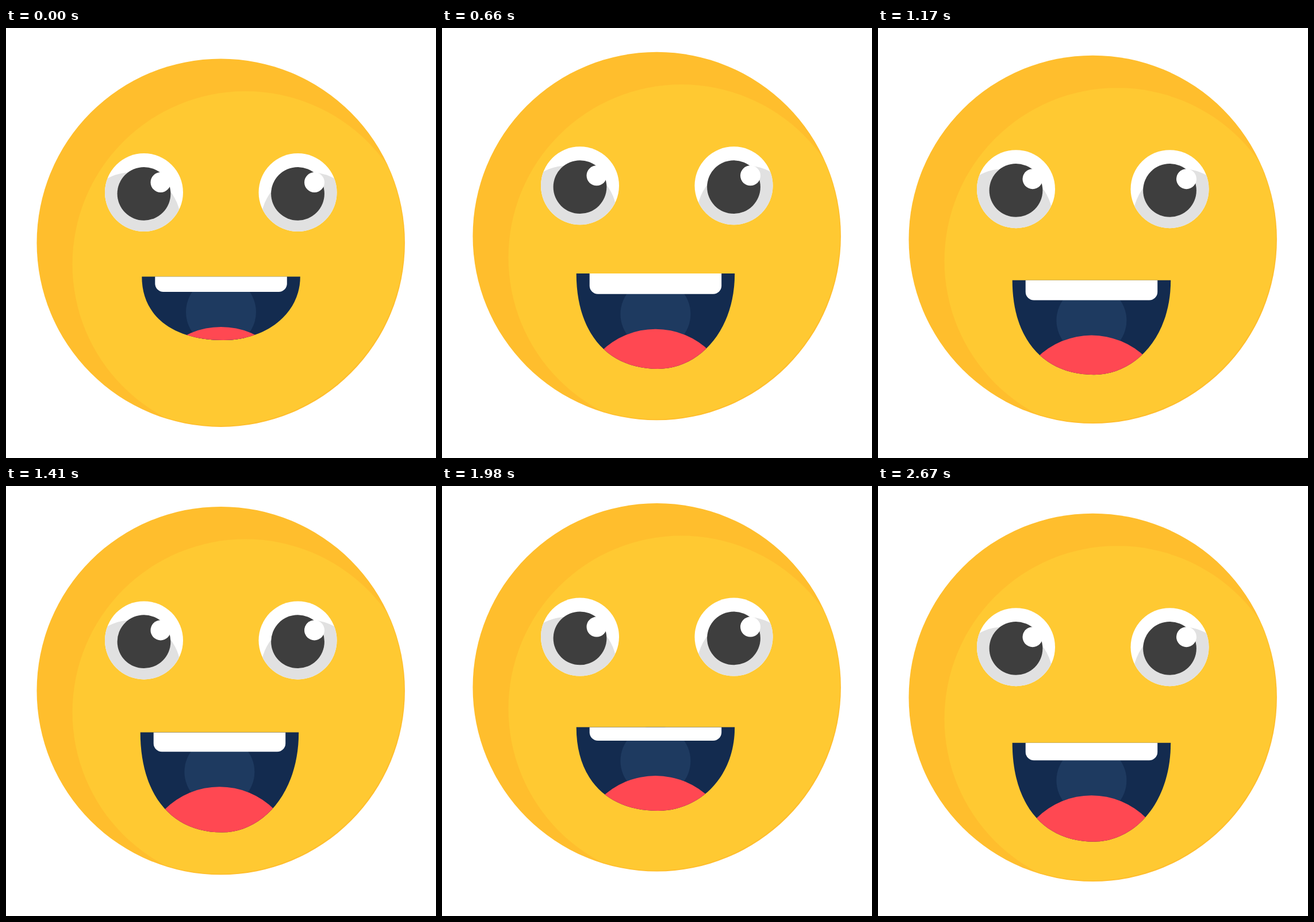
These frames come from a looping animation (748 by 748 pixels, 2.7 s). An HTML page:

```html
<!DOCTYPE html>
<html lang="en">
<head>
<meta charset="utf-8">
<title>Bouncing smiley</title>
<style>
html, body { margin: 0; width: 100%; height: 100%; overflow: hidden; background: #fff; }
svg { display: block; width: 100vw; height: 100vh; }
</style>
</head>
<body>
<svg viewBox="0 0 748 748">
  <defs>
    <clipPath id="faceClip"><circle cx="372.5" cy="372.3" r="319.7"/></clipPath>
    <clipPath id="eyeClip"><circle r="68"/></clipPath>
    <clipPath id="lipClip"><path class="lips" d="M0 0C0 .63 55 1 142 1C212.5 1 275.5 .61 275.5 0Z"/></clipPath>
    <g id="eyeball">
      <circle r="68" fill="#fff"/>
      <circle cx="-22" cy="51" r="86" fill="#e1e1e1" clip-path="url(#eyeClip)"/>
    </g>
    <g id="pupil">
      <circle cy="2.3" r="46.4" fill="#3e3e3e"/>
      <circle cx="29" cy="-17.5" r="17.5" fill="#fff"/>
    </g>
  </defs>
  <g id="head">
    <circle cx="373.7" cy="373.7" r="320.2" fill="#ffbe2d"/>
    <circle cx="416.5" cy="411" r="301" fill="#ffc932" clip-path="url(#faceClip)"/>
    <g transform="translate(240 286)"><use href="#eyeball"/><use href="#pupil"/></g>
    <g transform="translate(507.5 286)"><use href="#eyeball" transform="scale(-1 1)"/><use href="#pupil"/></g>
    <g id="mouth">
      <path class="lips" fill="#132b4f" d="M0 0C0 .63 55 1 142 1C212.5 1 275.5 .61 275.5 0Z"/>
      <g clip-path="url(#lipClip)">
        <g id="inside">
          <circle cx="137.7" cy="35" r="61" fill="#1e3a60"/>
          <circle cx="137.7" cy="196" r="135" fill="#ff4852"/>
          <rect x="23" y="-90" width="229.5" height="90" rx="14.5" fill="#fff"/>
        </g>
      </g>
    </g>
  </g>
</svg>
<script>
const LOOP = 2700, STEP = 30, HOLD = 150, LIFT = 29.3;
const get = id => document.getElementById(id);
const head = get('head'), mouth = get('mouth'), inside = get('inside');
const lips = document.querySelectorAll('.lips');

// Mouth poses on the head: step, lip line, teeth edge, opening height
const poses = [
  [5, 444, 478, 164],
  [15, 447.3, 488.3, 172],
  [29, 430, 460.4, 160],
  [39, 444.5, 479.4, 164.5],
  [55, 447.8, 480.3, 183.5],
  [66, 443, 466.5, 145.5],
  [89, 452.5, 483, 172]
];
const rest = [0, 432.5, 459, 110.5];

function poseAt(step) {
  if (step < poses[0][0]) return rest;
  const i = Math.max(1, poses.findIndex(p => p[0] >= step));
  const a = poses[i - 1], b = poses[i];
  const u = (step - a[0]) / (b[0] - a[0]);
  const ease = u * u * (3 - 2 * u);
  return a.map((v, j) => v + (b[j] - v) * ease);
}

function draw(ms) {
  const t = ms % LOOP;
  const step = t < HOLD ? 0 : Math.floor(t / STEP);
  const bounce = 1 - Math.abs(1 - step % 10 / 5);
  const [, top, teeth, open] = poseAt(step);
  head.setAttribute('transform', `translate(0 ${-LIFT * bounce})`);
  mouth.setAttribute('transform', `translate(${step ? 233.7 : 236.3} 0)`);
  inside.setAttribute('transform', `translate(0 ${teeth})`);
  lips.forEach(p => p.setAttribute('transform', `translate(0 ${top}) scale(1 ${open})`));
}

const start = performance.now();
function tick() {
  draw(performance.now() - start);
  requestAnimationFrame(tick);
}
draw(0);
requestAnimationFrame(tick);
</script>
</body>
</html>
```
